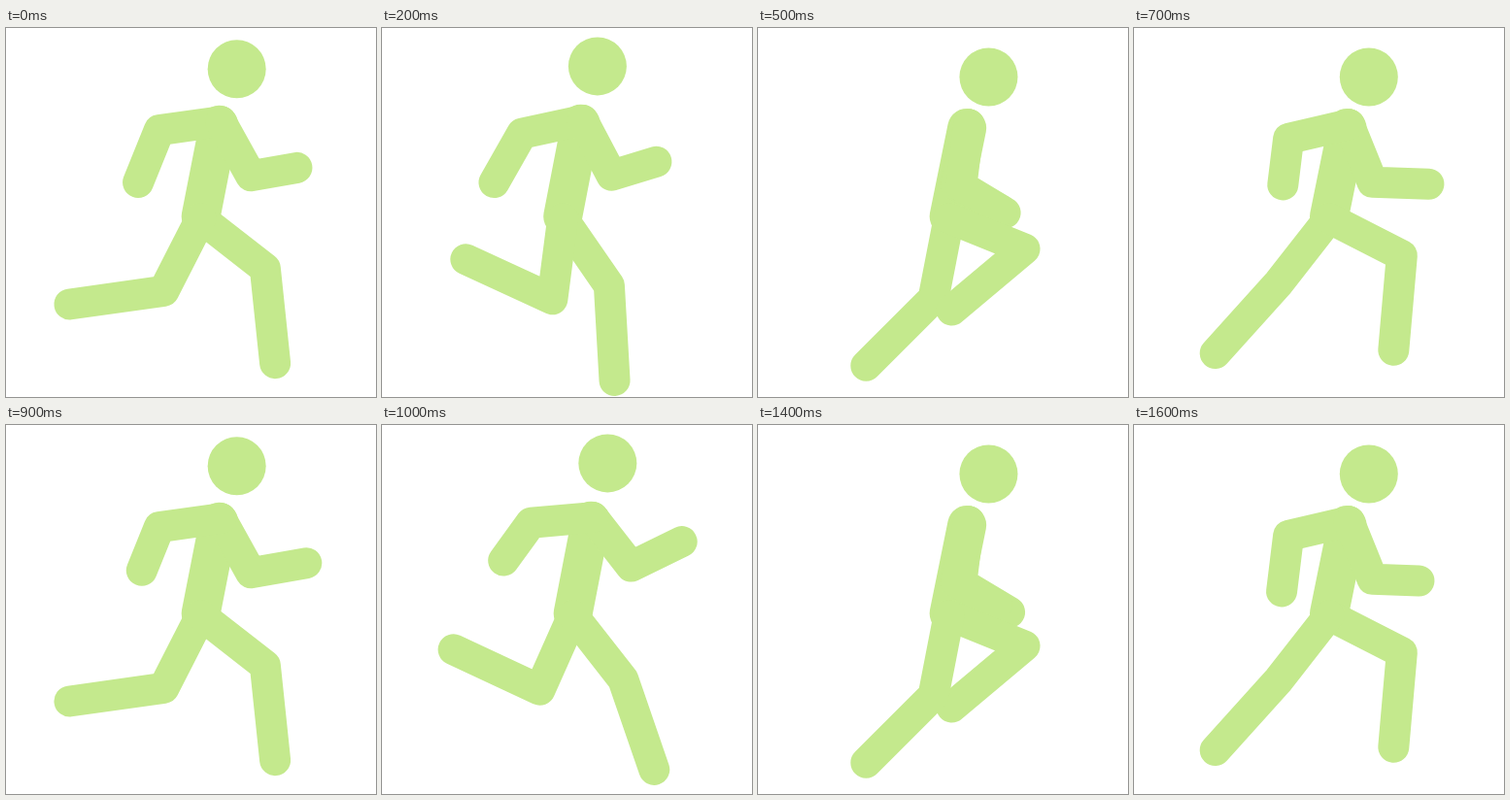
Animation, 381 px wide and 380 px high, one loop 1.7 s. Source, as an HTML page:

```html
<!DOCTYPE html>
<html lang="en">
<head>
<meta charset="utf-8">
<title>Runner</title>
<style>
  html, body { margin: 0; width: 100%; height: 100%; overflow: hidden; background: #fff; }
  svg { display: block; width: 100%; height: 100%; }
  path { fill: none; stroke: #c4e98d; stroke-width: 32; stroke-linecap: round; stroke-linejoin: round; }
  #torso { stroke-width: 40; }
  circle { fill: #c4e98d; }
</style>
</head>
<body>
<svg viewBox="0 0 381 380">
  <circle id="head" r="30"/>
  <path id="torso"/>
  <path id="armA"/>
  <path id="armB"/>
  <path id="legA"/>
  <path id="legB"/>
</svg>
<script>
// Two strides of nine steps; the loop leaves out the last step.
const STEP = 100, FRAMES = 17, STRIDE = 9, CYCLE = 2 * STRIDE;
const THIGH = 84, SHIN = 98, UPPER = 64, FOREARM = { A: 58, B: 48 };

// step, then degrees from straight down, forward positive: thigh, shin, upper arm, forearm
const gait = [
  [0, 52, 6, -82, -22],
  [1, 38, 19, -85, -36],
  [3, 31, -20, -63, -15],
  [5, -11, -45, -12, 61],
  [7, -38, -42, 22, 88],
  [9, -27, -82, 29, 100],
  [10, -24, -115, 38, 116],
  [12, 18, -114, 12, 91],
  [14, 68, -50, -7, 59],
  [16, 63, -5, -77, -7]
];

// Periodic monotone cubic interpolation of the gait angles
function angles(step) {
  const n = gait.length, s = step % CYCLE;
  const at = (k, c) => gait[(k + n) % n][c];
  const when = k => at(k, 0) + CYCLE * Math.floor(k / n);
  const i = gait.findLastIndex(key => key[0] <= s);
  const h = when(i + 1) - when(i), u = (s - when(i)) / h, v = 1 - u;
  const secant = (k, c) => (at(k + 1, c) - at(k, c)) / (when(k + 1) - when(k));
  const slope = (k, c) => {
    const a = secant(k - 1, c), b = secant(k, c);
    return a * b > 0 ? 2 * a * b / (a + b) : 0;
  };
  return [1, 2, 3, 4].map(c =>
    at(i, c) * v * v * (1 + 2 * u) + at(i + 1, c) * u * u * (3 - 2 * u)
    + h * u * v * (slope(i, c) * v - slope(i + 1, c) * u));
}

const el = id => document.getElementById(id);
const line = (id, ...points) => el(id).setAttribute('d', 'M' + points.flat().map(p => p.toFixed(2)).join(' '));

function reach([x, y], length, degrees) {
  const a = degrees * Math.PI / 180;
  return [x + length * Math.sin(a), y + length * Math.cos(a)];
}

function limb(id, root, length1, angle1, length2, angle2) {
  const joint = reach(root, length1, angle1);
  line(id, root, joint, reach(joint, length2, angle2));
}

function draw(step) {
  const turn = Math.PI / STRIDE;
  const lift = Math.cos(2 * turn * (step - 1.5));
  const hipX = 201 - 21.5 * Math.cos(turn * (step - 3)) ** 6;
  const neckX = hipX + 18.5, neckY = 101 - 2.5 * lift;

  el('head').setAttribute('cx', neckX + 20 - 3 * lift);
  el('head').setAttribute('cy', neckY - 55.5 - 4 * lift);
  line('torso', [neckX, neckY], [hipX, 194]);

  ['A', 'B'].forEach((side, k) => {
    const [thigh, shin, upper, fore] = angles(step + k * STRIDE);
    limb('arm' + side, [neckX + 2, neckY - 3.5], UPPER, upper, FOREARM[side], fore);
    limb('leg' + side, [hipX, 196], THIGH, thigh, SHIN, shin);
  });
}

const start = performance.now();
function tick() {
  draw(Math.floor((performance.now() - start) / STEP) % FRAMES);
  requestAnimationFrame(tick);
}
tick();
</script>
</body>
</html>
```
